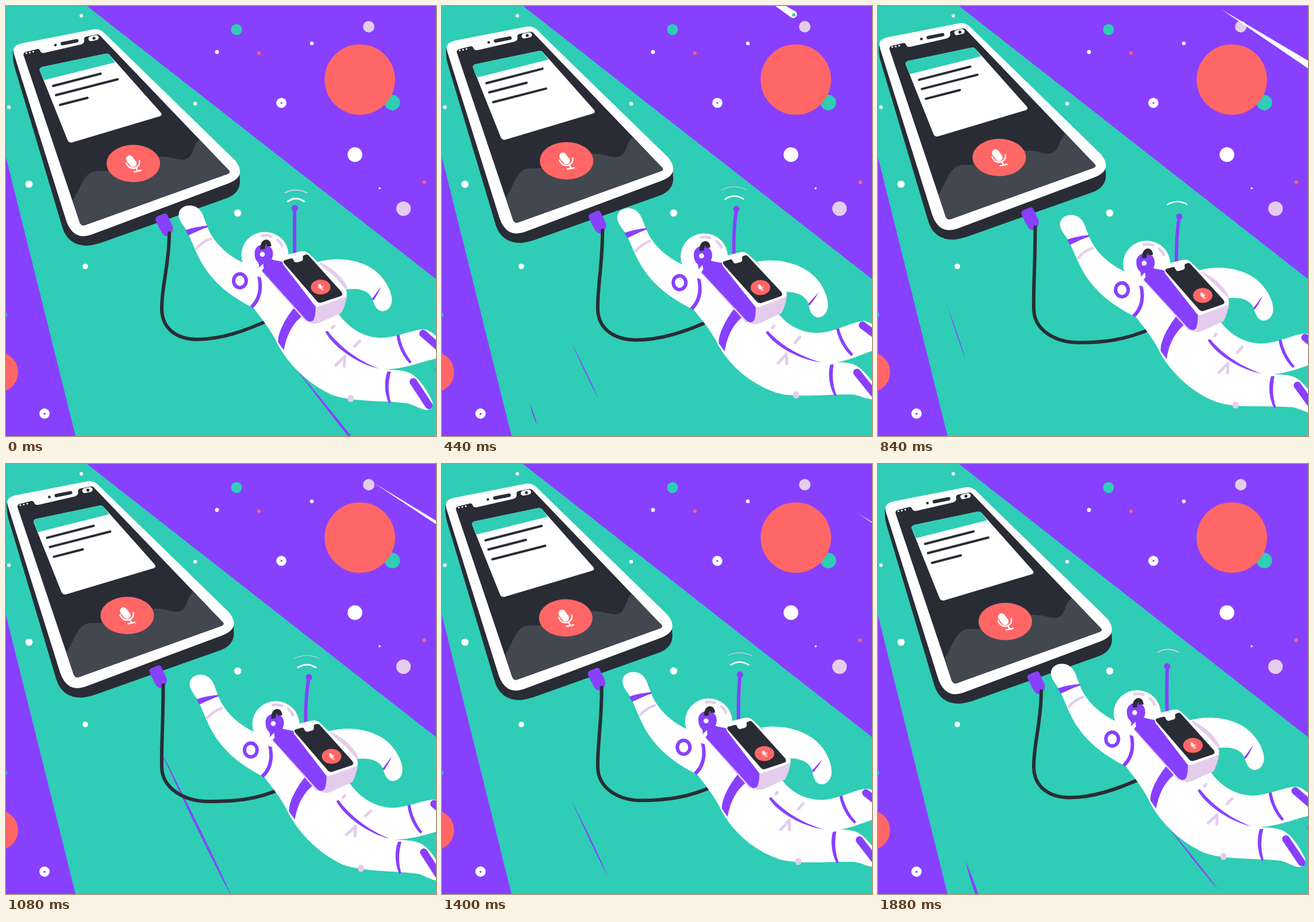
An HTML page for the animation above (1.92 s loop, 748 px wide and 748 px high).

```html
<!DOCTYPE html>
<html lang="en">
<head>
<meta charset="utf-8">
<title>Space call</title>
<style>
  html, body { margin: 0; width: 100%; height: 100%; overflow: hidden; background: #8840ff; }
  svg { display: block; width: 100vw; height: 100vh; }
  path { stroke-linecap: round; stroke-linejoin: round; }
  .w { fill: #fff; } .p { fill: #8840ff; } .d { fill: #292c35; }
  .t { fill: #2fcdb5; } .c { fill: #ff6766; } .l { fill: #e4cdec; }
  .pl, .ll, .dl, .wl { fill: none; }
  .pl { stroke: #8840ff; } .ll { stroke: #e4cdec; } .dl { stroke: #292c35; } .wl { stroke: #fff; }
</style>
</head>
<body>
<svg viewBox="0 0 748 748">
  <defs>
    <g id="mic">
      <path class="wl" stroke-width="12.5" d="M215 266L221 274"/>
      <path class="wl" stroke-width="2.400" d="M209 273Q214 284 224 282Q234 278 232 269M226 281L229 287M223 288.500L235 286"/>
    </g>
  </defs>
  <rect class="p" width="748" height="748"/>
  <path class="t" d="M0 0H141L748 475V748H121L0 263Z"/>
  <g id="stars"></g>
  <path id="comet" class="w"/>
  <circle id="core" class="t" r="3"/>
  <path id="streaks" class="p"/>

  <g id="phone">
    <path class="d" d="M12 78Q11 95 16 110L98 385Q108 417 142 417Q152 416 165 412L385 334Q407 325 407 305L406 285Z"/>
    <path class="w" d="M27 65L150 41Q163 38 172 48L398 268Q410 282 406 294Q402 303 386 309L148 398Q124 406 112 388Q107 381 104 371L14 84Q9 69 27 65Z"/>
    <path class="d" d="M34 80L54 75Q58 74 60 79Q62 83 69 81L130 67Q137 65 136 59Q135 54 141 53L156 50Q161 48 165 53L388 286Q391 290 386 292L138 381Q131 384 128 376L31 87Q29 82 34 80Z"/>
    <path fill="#43474f" d="M116 338C128 322 135 287 158 287C190 288 215 285 240 273C262 257 278 262 300 267C328 272 322 245 336 233L388 286Q391 290 386 292L138 381Q131 384 128 376Z"/>
    <path class="dl" stroke-width="6" d="M98 65.500L123 60.500"/>
    <circle class="d" cx="86" cy="68" r="2.300"/>
    <path class="wl" stroke-width="3" d="M35.500 82h0M41.500 81h0M47.500 79.500h0"/>
    <path class="wl" stroke-width="8.500" d="M147.500 57L157 55"/>
    <circle class="d" cx="153" cy="56" r="2.600"/>
    <path class="w" d="M63 106L173 83Q178 82 181 86L269 185Q273 190 267 192L116 237Q110 239 107 233L59 113Q57 108 63 106Z"/>
    <path class="t" d="M63 106L173 83Q178 82 181 86L190 98L66 129L59 113Q57 108 63 106Z"/>
    <path id="text" class="dl" stroke-width="4"/>
    <ellipse class="c" cx="221.500" cy="274" rx="46.500" ry="32.500"/>
    <use href="#mic"/>
    <path class="p" d="M263 366L275 361Q279 360 281 364L289 381Q293 390 286 397Q279 404 272 396Q266 386 260 372Q259 368 263 366Z"/>
  </g>
  <path id="cable" class="dl" stroke-width="6"/>

  <g id="astro">
    <g id="waves"></g>
    <path id="mast" class="pl" stroke-width="6"/>
    <circle id="knob" class="p" r="5.500"/>
    <g id="farArm">
      <path class="w" d="M540 446C580 434 625 443 648 466C664 482 671 500 671 512C670 526 661 531 654 531C645 530 641 522 638 513C635 500 620 488 588 494Z"/>
      <path class="p" d="M636 510L652 488Q648 499 639 512Z"/>
    </g>
    <path id="shade" class="l" d="M546 446C565 454 585 470 594 490L590 497C580 475 560 460 546 452Z"/>

    <path data-leg=".8" class="w" d="M580 538C600 565,630 580,660 577C690 573,710 562,728 563C742 565,755 582,775 602L765 611C730 614,705 631,655 633L590 620Z"/>
    <path data-leg=".8" class="pl" stroke-width="13" d="M725 570L757 598"/>
    <path data-leg=".8" class="p" d="M679 573C681 592,692 613,702 622L705 619C694 605,687 590,684 572Z"/>

    <path data-leg="1" class="w" d="M440 450C425 480,418 505,426 520C445 545,462 565,473 590C490 620,520 655,565 676C600 690,660 686,700 692C715 697,722 703,733 703C742 700,743 692,740 686C730 665,715 643,700 638C685 632,665 634,655 632C620 600,600 575,580 538L520 460Z"/>
    <path data-leg="1" class="pl" stroke-width="13" d="M708 654L735 695"/>
    <path data-leg="1" class="p" d="M663 636C656 655,659 678,666 692L669 690C664 672,664 655,669 636Z"/>
    <path data-leg="1" class="p" d="M555 567C570 594,612 623,648 631C612 617,580 593,559 565Z"/>
    <path data-leg="1" class="ll" stroke-width="5" d="M567 560L570 557M606 592L615 583M573 625L589 610L588 627"/>
    <path data-leg="1" class="ll" stroke-width="10.500" d="M599 682L599 684"/>
    <path class="p" d="M503 522C484 545 472 570 473 585L483 599C488 570 500 550 518 537Z"/>

    <path class="w" d="M319 347C333 347 341 357 345 371L350 384C357 403 375 428 411 446L440 458L445 500L427 524C395 507 367 488 345 455C330 432 322 405 313 389C306 379 300 372 300 363C300 353 309 347 319 347Z"/>
    <path class="p" d="M312 390C325 385 340 383 351 382L350 385C340 388 330 393 317 399Z"/>
    <path class="ll" stroke-width="4.500" d="M331 422Q341 410 356 405"/>
    <ellipse class="pl" cx="406.500" cy="478" rx="11" ry="12" stroke-width="6"/>
    <path class="p" d="M432 456C442 480 442 506 424 522L429 526C449 508 448 478 437 455Z"/>

    <ellipse class="w" cx="450" cy="433" rx="41" ry="40"/>
    <path class="p" d="M432 430C432 410 464 409 464 431C464 441 458 445 452 447L439 457Q441 450 438 446Q432 441 432 430Z"/>
    <path class="dl" stroke-width="8" style="stroke-linecap:butt" d="M446 423C445 409 457 406 457 418"/>
    <circle class="w" cx="445.500" cy="432" r="4.300"/>
    <path class="ll" stroke-width="4.500" d="M445 400Q453 398 461 401M472 407Q478 412 480 418"/>

    <path class="ll" stroke-width="5" d="M445 459L522 547"/>
    <path class="l" d="M537 521L593 503Q590 521 583 534L545 551Q535 555 525 549Z"/>
    <path class="p" d="M446 447Q452 436 466 442L486 446L538 519Q539 535 535 546Q528 553 520 544L446 462Q442 455 446 447Z"/>
    <path class="w" d="M439 456L447 448L448 456L444 461Z"/>
    <path class="w" d="M487 433L512 427Q521 425 527 431L588 490Q596 500 590 506L543 523Q538 524 535 519L482 450Q477 437 487 433Z"/>
    <path class="d" d="M485 442L496 439Q499 439 500 443Q502 447 506 446L513 444Q517 443 516 438Q515 434 520 433Q524 431 527 435L583 497Q587 503 581 505L548 516Q543 517 540 513L483 447Q481 443 485 442Z"/>
    <ellipse class="c" cx="547" cy="489" rx="17" ry="13"/>
    <use href="#mic" transform="translate(465.500 387.500) scale(.37)"/>
  </g>
</svg>
<script>
const LOOP = 1920, STEP = 40, TAU = Math.PI * 2;
const $ = id => document.getElementById(id);
const set = (id, name, value) => $(id).setAttribute(name, value);
const svg = (tag, attrs, parent) => {
  const el = document.createElementNS('http://www.w3.org/2000/svg', tag);
  for (const k in attrs) el.setAttribute(k, attrs[k]);
  return parent.appendChild(el);
};
const clamp = v => Math.min(1, Math.max(0, v));

// 0 at the given time, 1 half a period later
const swing = (t, low, period) => (1 - Math.cos(TAU * (t - low) / period)) / 2;

// linear value between [time, value] keys
function track(t, keys) {
  for (let i = 1; i < keys.length; i++) {
    const [a, u] = keys[i - 1], [b, v] = keys[i];
    if (t <= b) return u + (v - u) * clamp((t - a) / (b - a));
  }
  return keys[keys.length - 1][1];
}

// x, y, radius, colour class
[[131, 17, 3, 'w'], [367, 80, 3.4, 'w'], [401, 41, 9.5, 't'], [440, 82, 3, 'c'],
 [532, 65, 3.2, 'w'], [631, 36, 10, 'l'], [672, 168, 13.5, 't'], [615.5, 128, 61.3, 'c'],
 [479, 168.500, 8.8, 'w'], [479, 168.500, 1.6, 'p'], [607, 258.500, 12.8, 'w'], [650, 317, 1.8, 'w'],
 [727.5, 306.500, 3.2, 'c'], [691.500, 352.500, 12.6, 'l'], [329, 170, 3.3, 'w'], [5, 176, 3.2, 'w'],
 [40, 310, 6.3, 'w'], [403, 360, 6.3, 'w'], [138, 453, 4.8, 'w'], [67, 709, 9, 'w'],
 [67, 709.500, 1.8, 'p'], [-14, 637, 35, 'c'], [-3, 537, 5, 't']
].forEach(([cx, cy, r, c]) => svg('circle', { cx, cy, r, class: c }, $('stars')));

// top x, y, bottom x, y, times of full length
const STREAKS = [
  [503, 629, 655, 820, [-30, 1708]],
  [225, 585, 357, 860, [170, 1182]],
  [152, 690, 186, 790, [180, 1840]],
  [120, 520, 232, 848, [540]],
  [262, 485, 440, 850, [975]],
  [742, 627, 800, 700, [-30, 1840]]
];
const GROW = 100, SHRINK = 420;

function streak([x, y, ex, ey, peaks], t) {
  return peaks.map(peak => {
    const dt = t - peak;
    if (dt < -GROW || dt > SHRINK) return '';
    const from = dt < 0 ? -dt / GROW : 0;
    const to = dt < 0 ? 1 : 1 - dt / SHRINK;
    const len = to - from, w = 6 * len;
    const at = k => [x + (ex - x) * k, y + (ey - y) * k];
    const [ax, ay] = at(from), [mx, my] = at(from + len * .65), [bx, by] = at(to);
    return `M${ax} ${ay}Q${mx + w} ${my} ${bx} ${by}Q${mx - w} ${my} ${ax} ${ay}Z`;
  }).join('');
}

function drawComet(t) {
  const head = track(t, [[220, 565], [280, 582], [600, 640], [1080, 900], [1400, 980]]);
  const tip = track(t, [[220, 480], [600, 555], [1080, 640], [1400, 722], [1600, 790]]);
  const y = x => 33 + .635 * (x - 640);
  const nx = 3.5, ny = -5.5;
  set('comet', 'd', t < 220 ? '' : `M${tip} ${y(tip)}L${head + nx} ${y(head) + ny}` +
    `A6.5 6.5 0 0 1 ${head - nx} ${y(head) - ny}Z`);
  set('core', 'cx', t < 220 ? -20 : head + 1);
  set('core', 'cy', y(head) + 1);
}

function drawText(t) {
  const rows = [
    [82, 139, 81 + 20 * swing(t, 90, 960)],
    [87, 155, 108 - 46 * swing(t, 40, 960)],
    [94, 172, 47 + 48 * swing(t, 40, 960)]
  ];
  set('text', 'd', rows.map(([x, y, w]) => `M${x} ${y}l${w} ${-.257 * w}`).join(''));
}

const arcs = [0, 1, 2, 3, 4, 5].map(() => svg('path', { fill: 'none' }, $('waves')));
function drawWaves(t) {
  arcs.forEach((arc, i) => {
    let age = t - i * 324;
    if (i === 5 && age < 0) age += LOOP;
    const alive = age >= 0 && age < 500;
    const half = 14 + .016 * age, y = 352 - 17 - .05 * age;
    arc.setAttribute('d', alive ? `M${504 - half} ${y + 5}Q504 ${y - 5} ${504 + half} ${y + 5}` : '');
    arc.setAttribute('stroke', age < 200 ? '#fff' : '#e4cdec');
    arc.setAttribute('stroke-width', Math.max(.3, 3 - .0045 * age));
  });
}

// legs bend smoothly around the hip
const HIP = [520, 590];
const legs = [...document.querySelectorAll('[data-leg]')].map(el =>
  ({ el, d: el.getAttribute('d'), share: +el.dataset.leg }));
function bend(d, angle) {
  return d.replace(/(-?[\d.]+) (-?[\d.]+)/g, (_, px, py) => {
    const x = px - HIP[0], y = py - HIP[1];
    const k = clamp((x * .8 + y * .6) / 80);
    const a = angle * k * k * (3 - 2 * k), c = Math.cos(a), s = Math.sin(a);
    return `${(HIP[0] + x * c - y * s).toFixed(2)} ${(HIP[1] + x * s + y * c).toFixed(2)}`;
  });
}

function drawAstro(t, bx, by) {
  // the whole body leans back on the first kick only
  const beat = swing(t, 100, 960);
  const lean = t >= 100 && t < 1060 ? -1.2 * beat : 0;
  set('astro', 'transform', `translate(${bx} ${by}) rotate(${lean} 450 400)`);
  legs.forEach(({ el, d, share }) => el.setAttribute('d', bend(d, (.01 - .108 * beat) * share)));

  const arm = swing(t, 30, 960);
  set('farArm', 'transform', `rotate(${7.6 * arm} 560 460)`);
  set('shade', 'transform', `translate(${-8 * arm} ${5 * arm})`);

  const tip = 502 + 8 * swing(t, 0, 640);
  set('mast', 'd', `M502 432Q501 390 ${tip} 351.5`);
  set('knob', 'cx', tip);
  set('knob', 'cy', 351.5);
  drawWaves(t);
}

function draw(t) {
  const p = -11 * swing(t, 0, LOOP);
  const bx = 19.5 * swing(t, 96, LOOP) - .1;
  const by = 20.5 * swing(t, 150, LOOP) ** 1.15 - .9;
  set('phone', 'transform', `translate(${p} ${p})`);
  const low = 580 + .36 * by;
  set('cable', 'd', `M${284 + p} ${395 + p}C${284 + p} 450 270 490 271 528` +
    `C272 564 ${300 + bx * .5} ${low} ${333 + bx} ${low}` +
    `C${373 + bx} ${low} ${415 + bx} ${566 + by} ${462 + bx} ${544 + by}`);
  set('streaks', 'd', STREAKS.map(s => streak(s, t)).join(''));
  drawComet(t);
  drawText(t);
  drawAstro(t, bx, by);
}

const start = performance.now();
function tick() {
  const t = (performance.now() - start) % LOOP;
  draw(Math.floor(t / STEP) * STEP);
  requestAnimationFrame(tick);
}
tick();
</script>
</body>
</html>
```
